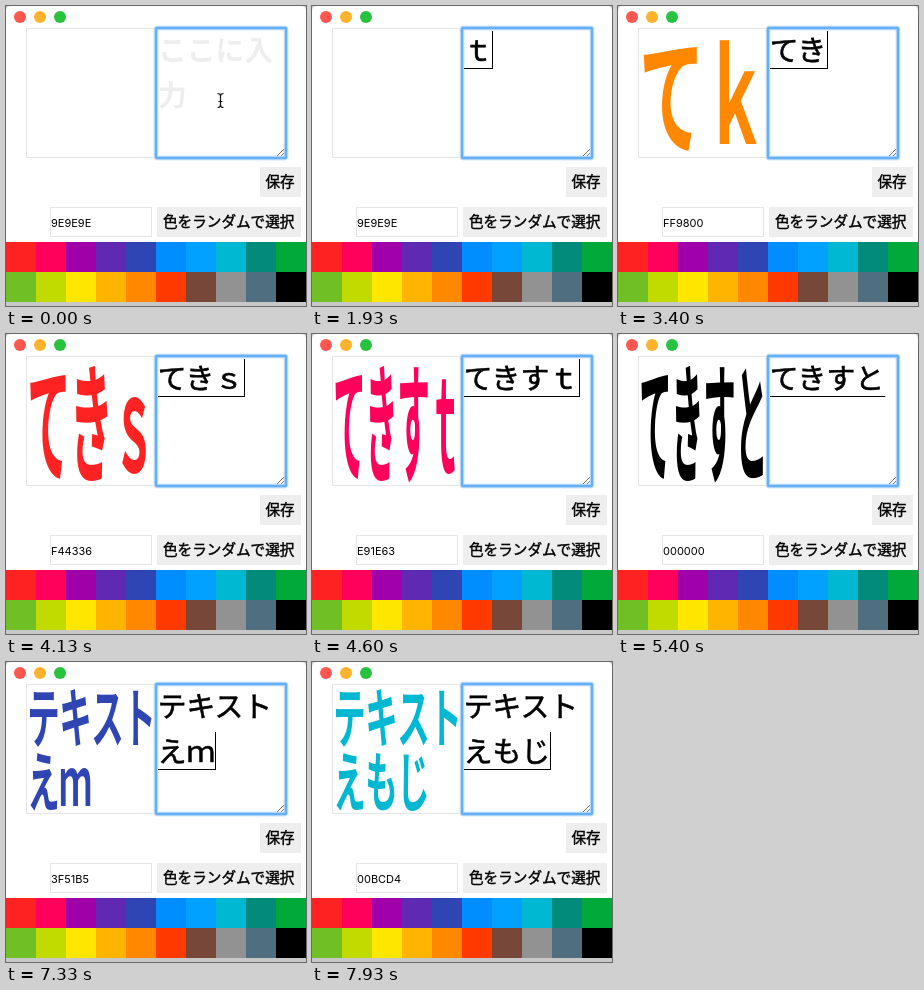
Recreate the animation shown at these times as an HTML page. Size 300x300 px, loop 8000 ms.

```html
<!DOCTYPE html>
<html lang="ja">
<head>
<meta charset="utf-8">
<title>文字スタンプ</title>
<style>
  html, body { margin: 0; width: 100%; height: 100%; overflow: hidden; background: #fff; }
  svg { display: block; width: 100vw; height: 100vh; }
  text { font-family: "Noto Sans CJK JP", "Noto Sans CJK", sans-serif; }
  .button { font-size: 14.6px; text-anchor: middle; stroke: #000; stroke-width: .4; }
  .typed { font-size: 28.8px; stroke: #000; stroke-width: .6; }
  .hint { font-size: 28.8px; font-weight: 700; fill: #eee; }
  #hex { font: 11px Inter, sans-serif; }
  #preview text { font-size: 130px; font-weight: 700; text-anchor: middle; }
  .ring { fill: none; }
</style>
</head>
<body>
<svg viewBox="0 0 300 300">
  <path d="M0 0H5Q0 0 0 5ZM300 0H295Q300 0 300 5Z" fill="#ccc"/>
  <circle cx="14" cy="11" r="6" fill="#ff5650"/>
  <circle cx="34" cy="11" r="6" fill="#ffb32c"/>
  <circle cx="54" cy="11" r="6" fill="#27c33f"/>
  <rect x="20.5" y="22.5" width="128" height="129" fill="#fff" stroke="#e6e6e6"/>
  <g id="preview"></g>
  <rect x="150" y="22" width="130" height="130" rx="1.5" fill="#fff" stroke="#d6e9fc" stroke-width="5"/>
  <rect class="ring" x="150" y="22" width="130" height="130" rx="1" stroke="#a0cdf7" stroke-width="3.4"/>
  <rect class="ring" x="150" y="22" width="130" height="130" rx="1" stroke="#64b0f3" stroke-width="2"/>
  <path d="M271 150l7-7M275 150l3-3" stroke="#666" stroke-width=".9"/>
  <g id="hint">
    <text class="hint" x="152" y="55">ここに入</text>
    <text class="hint" x="152" y="100">力</text>
    <path d="M211.5 87.5Q214.500 87.5 214.5 90V99Q214.5 101.5 211.5 101.5M217.5 87.5Q214.5 87.5 214.5 90M217.5 101.5Q214.5 101.5 214.5 99M212.5 95.5h4" fill="none" stroke="#111" stroke-width="1.2"/>
  </g>
  <text class="typed" id="line0" x="151.7" y="55.2"></text>
  <text class="typed" id="line1" x="151.7" y="100.2"></text>
  <rect id="underline" height="1"/>
  <rect id="caret"/>
  <rect id="tail" x="268" y="25" width="1" height="38"/>
  <rect x="254" y="161" width="41" height="30" fill="#eee"/>
  <text class="button" x="274" y="180.700">保存</text>
  <rect x="44.5" y="201.5" width="101" height="29" fill="#fff" stroke="#e6e6e6"/>
  <text id="hex" x="45" y="221"></text>
  <rect x="151" y="201" width="144" height="30" fill="#eee"/>
  <text class="button" x="222.7" y="220.700">色をランダムで選択</text>
  <g id="palette" shape-rendering="crispEdges"></g>
  <rect y="296" width="300" height="4" fill="#c8c8c8"/>
</svg>
<script>
const LOOP = 8000, CELL = 28.8, SIZE = 128;
const $ = id => document.getElementById(id);

// name shown in the field -> colour on screen, in swatch order
const PALETTE = new Map([
  ['F44336', '#ff2222'], ['E91E63', '#ff005b'], ['9C27B0', '#9f00aa'], ['673AB7', '#6029b4'], ['3F51B5', '#3045b4'],
  ['2196F3', '#008eff'], ['03A9F4', '#00a1ff'], ['00BCD4', '#00b8d1'], ['009688', '#008b7b'], ['4CAF50', '#00a93a'],
  ['8BC34A', '#70bf25'], ['CDDC39', '#c1da00'], ['FFEB3B', '#ffe700'], ['FFC107', '#ffb500'], ['FF9800', '#ff8800'],
  ['FF5722', '#ff3900'], ['795548', '#774839'], ['9E9E9E', '#929292'], ['607D8B', '#4f6f81'], ['000000', '#000000']
]);

// [time, text in the field, is the last line uncommitted]
const TYPING = [
  [0, '', false], [1930, 'ｔ', true], [2600, 'て', true], [3000, 'てｋ', true], [3400, 'てき', true],
  [3800, 'てきｓ', true], [4200, 'てきす', true], [4530, 'てきすｔ', true], [4870, 'てきすと', true],
  [5470, 'テキスト', true], [5800, 'テキスト', false], [6130, 'テキスト\n', false],
  [7000, 'テキスト\nえ', true], [7270, 'テキスト\nえｍ', true], [7530, 'テキスト\nえも', true],
  [7730, 'テキスト\nえもｊ', true], [7870, 'テキスト\nえもじ', true]
];

// [time, rendered text, colour name]
const RENDERS = [
  [0, '', '9E9E9E'], [2000, 'ｔ', '4CAF50'], [2670, 'て', '03A9F4'], [3070, 'てｋ', 'FF9800'],
  [3470, 'てき', '673AB7'], [3870, 'てきｓ', 'F44336'], [4270, 'てきす', '2196F3'],
  [4600, 'てきすｔ', 'E91E63'], [4870, 'てきすと', '000000'], [5530, 'テキスト', '607D8B'],
  [6470, 'テキスト', '9E9E9E'], [7070, 'テキスト\nえ', '8BC34A'], [7330, 'テキスト\nえｍ', '3F51B5'],
  [7600, 'テキスト\nえも', 'FF5722'], [7800, 'テキスト\nえもｊ', '9C27B0'], [7930, 'テキスト\nえもじ', '00BCD4']
];

const at = (list, t) => list.findLast(step => step[0] <= t);
const show = (el, on) => el.setAttribute('visibility', on ? 'visible' : 'hidden');
const set = (el, attrs) => { for (const k in attrs) el.setAttribute(k, attrs[k]); };

$('palette').innerHTML = [...PALETTE.values()].map((fill, i) =>
  `<rect x="${i % 10 * 30}" y="${236 + Math.floor(i / 10) * 30}" width="30" height="30" fill="${fill}"/>`).join('');

// Every character fills a square; the whole grid is squeezed to the stamp size.
function renderStamp(text, name) {
  const lines = text.split('\n');
  const cols = Math.max(1, ...lines.map(l => l.length));
  const glyphs = lines.flatMap((line, row) => [...line].map((ch, col) =>
    `<text x="${(col + .512) * SIZE}" y="${(row + .895) * SIZE}">${ch}</text>`));
  set($('preview'), {
    fill: PALETTE.get(name),
    transform: `translate(21 23) scale(${1 / cols} ${1 / lines.length})`
  });
  $('preview').innerHTML = glyphs.join('');
  $('hex').textContent = name;
}

function renderField(text, composing) {
  const lines = text.split('\n'), row = lines.length - 1;
  const end = 152 + lines[row].length * CELL;
  const bare = !lines[row];
  $('line0').textContent = lines[0];
  $('line1').textContent = lines[1] || '';
  show($('hint'), !text);
  show($('underline'), composing);
  set($('underline'), { x: 152, y: 62 + row * 45, width: end - 152 });
  set($('caret'), {
    x: bare ? 150.5 : Math.floor(end) + (composing ? 0 : 1),
    y: row ? (bare ? 68 : 70) : 25,
    width: bare ? 1.5 : 1,
    height: bare && !row ? 36 : 38,
    fill: bare ? '#0c2f5c' : '#000'
  });
}

function caretAlpha(t) {
  if (t < 400) return 0;
  if (t < 930) return 1;
  if (t < 1130) return 1 - (Math.floor((t - 930) / 67) + 1) / 3;
  if (t < 1400) return 0;
  return t >= 5400 && t < 5800 ? 0 : 1;
}

let lastStep, lastRender;
function draw(t) {
  const step = at(TYPING, t), render = at(RENDERS, t);
  if (step !== lastStep) renderField(step[1], step[2]);
  if (render !== lastRender) renderStamp(render[1], render[2]);
  lastStep = step;
  lastRender = render;
  set($('caret'), { opacity: caretAlpha(t) });
  show($('tail'), t >= 5800 && t < 6270);
}

const origin = performance.now();
function tick() {
  draw((performance.now() - origin) % LOOP);
  requestAnimationFrame(tick);
}
tick();
</script>
</body>
</html>
```
